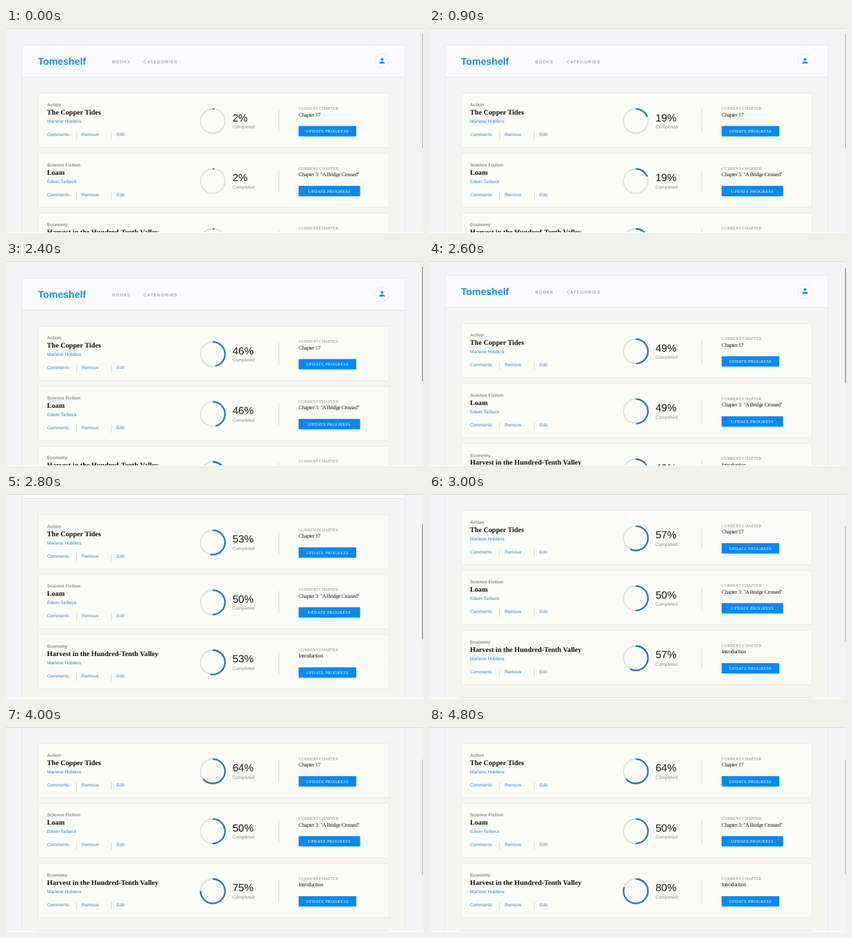
Write an HTML page that moves like this. It is 600 px wide and 296 px high and loops after 5000 ms.

```html
<!DOCTYPE html>
<html lang="en">
<head>
<meta charset="utf-8">
<title>Reading progress</title>
<style>
  html, body { margin: 0; width: 100%; height: 100%; overflow: hidden; background: #f3f2f4; }
  svg { display: block; width: 600px; height: 296px; }
  text { font: 6.55px "Liberation Sans", Arial, sans-serif; fill: #8b8b8b; text-rendering: geometricPrecision; white-space: pre; }
  .logo { font-size: 14px; font-weight: bold; fill: #118ae6; }
  .nav { font-size: 6px; letter-spacing: 1px; fill: #7c7c7c; }
  .genre { font-weight: bold; }
  .link { fill: #437fb3; }
  .pct { font-size: 15px; fill: #151515; }
  .title, .label, .chapter, .action { font-family: "Liberation Serif", "Times New Roman", serif; }
  .title { font-size: 10.13px; font-weight: bold; fill: #0c0c0c; }
  .label { font-size: 6.1px; }
  .chapter { font-size: 8px; letter-spacing: -.4px; fill: #1c1c1c; }
  .action { font-size: 6.1px; letter-spacing: .35px; fill: #fff; text-anchor: middle; }
  .rule { stroke: #dcdcda; }
  .ring { fill: none; stroke: #e2e3df; stroke-width: 2.3; }
  .arc { stroke: #2e78b5; }
</style>
</head>
<body>
<svg viewBox="0 0 600 296">
  <defs>
    <linearGradient id="shade" x2="0" y2="1">
      <stop offset="0" stop-color="#f5f4f6"/>
      <stop offset=".6" stop-color="#f4f4f1"/>
    </linearGradient>
  </defs>
  <rect width="600" height="296" fill="#f3f2f4"/>
  <g id="page">
    <rect x="23.5" y="25" width="550.5" height="500" fill="url(#shade)" stroke="#e7e6e8"/>
    <rect x="24" y="25.5" width="549.5" height="45" fill="#fbfafc"/>
    <path d="M24 71H574" stroke="#e3e2e4"/>
    <text class="logo" x="46" y="52.5">Tomeshelf</text>
    <text class="nav" x="153" y="50.5">BOOKS</text>
    <text class="nav" x="198" y="50.5">CATEGORIES</text>
    <circle cx="541" cy="47.5" r="10" fill="#fdfdfe" stroke="#ebebee"/>
    <g fill="#118ae6">
      <circle cx="541" cy="45.2" r="2"/>
      <path d="M541 48.2c-1.4 0-4 .7-4 2v1h8v-1c0-1.300-2.600-2-4-2z"/>
    </g>
    <g id="cards"></g>
    <path d="M46 364.500H551" stroke="#dfdfdc"/>
  </g>
  <path d="M0 .5H600" stroke="#dcdcdc"/>
  <path d="M0 295.500H600" stroke="#fcfcfc"/>
  <rect id="thumb" x="598.8" y="8" width="1.2" height="166" rx=".5"/>
</svg>
<script>
const $ = id => document.getElementById(id);
const PITCH = 86.6, RADIUS = 17.6, GIRTH = 2 * Math.PI * RADIUS;
const STEP = 100, LAST = 48, LOOP = 5000;

const books = [
  { genre: 'Action', title: 'The Copper Tides', author: 'Marlene Hobbins', chapter: 'Chapter 17', goal: 64, button: 83 },
  { genre: 'Science Fiction', title: 'Loam', author: 'Edwin Tarbeck', chapter: 'Chapter 3: "A Bridge Crossed"', goal: 50, button: 88.5 },
  { genre: 'Economy', title: 'Harvest in the Hundred-Tenth Valley', author: 'Marlene Hobbins', chapter: 'Introduction', goal: 80, button: 83 }
];

const text = (cls, x, y, s) => `<text class="${cls}" x="${x}" y="${y}">${s}</text>`;

const card = (b, i) => `<g transform="translate(0 ${94 + i * PITCH})">
  <rect x="46.5" y=".3" width="504.5" height="78.300" rx="1" fill="#fbfbf8" stroke="#e9e9e7"/>
  ${text('genre', 59, 19.3, b.genre)}
  ${text('title', 59, 31.2, b.title)}
  ${text('link', 59, 43.2, b.author)}
  ${text('link', 59, 62.2, 'Comments')}
  ${text('link', 109, 62.2, 'Remove')}
  ${text('link', 159, 62.2, 'Edit')}
  <path class="rule" d="M101.500 56v11.500M151.500 56v11.500M392.500 24v33"/>
  <circle class="ring" cx="297.5" cy="40.4" r="${RADIUS}"/>
  <circle class="ring arc" cx="297.5" cy="40.4" r="${RADIUS}" transform="rotate(-90 297.5 40.4)"/>
  ${text('pct', 326, 40.7, '')}
  ${text('', 326, 51.2, 'Completed')}
  ${text('label', 421, 24.2, 'CURRENT CHAPTER')}
  ${text('chapter', 421, 33.6, b.chapter)}
  <rect x="421" y="47.5" width="${b.button}" height="15" rx="1" fill="#0689f7"/>
  ${text('action', 421 + b.button / 2, 57, 'UPDATE PROGRESS')}
</g>`;

$('cards').innerHTML = books.map(card).join('');
const arcs = document.querySelectorAll('.arc');
const counts = document.querySelectorAll('.pct');

const ease = p => p < .5 ? 4 * p ** 3 : 1 - 4 * (1 - p) ** 3;

function draw(now) {
  const n = Math.min(LAST, Math.floor(now % LOOP / STEP));
  const t = n * STEP;
  books.forEach((b, i) => {
    const value = Math.min(b.goal, Math.round(2.2 + 1.815 * n));
    counts[i].textContent = value + '%';
    arcs[i].setAttribute('stroke-dasharray', `${GIRTH * value / 100} ${GIRTH}`);
  });
  const scroll = 70.5 * ease(Math.min(1, Math.max(0, (t - 2500) / 415)));
  $('page').setAttribute('transform', `translate(0 ${-scroll})`);
  $('thumb').setAttribute('y', 8 + scroll * .55);
  $('thumb').setAttribute('fill', t >= 1800 && t < 3000 ? '#808080' : '#b8b8b8');
}

const start = performance.now();
(function tick() {
  draw(performance.now() - start);
  requestAnimationFrame(tick);
})();
</script>
</body>
</html>
```
